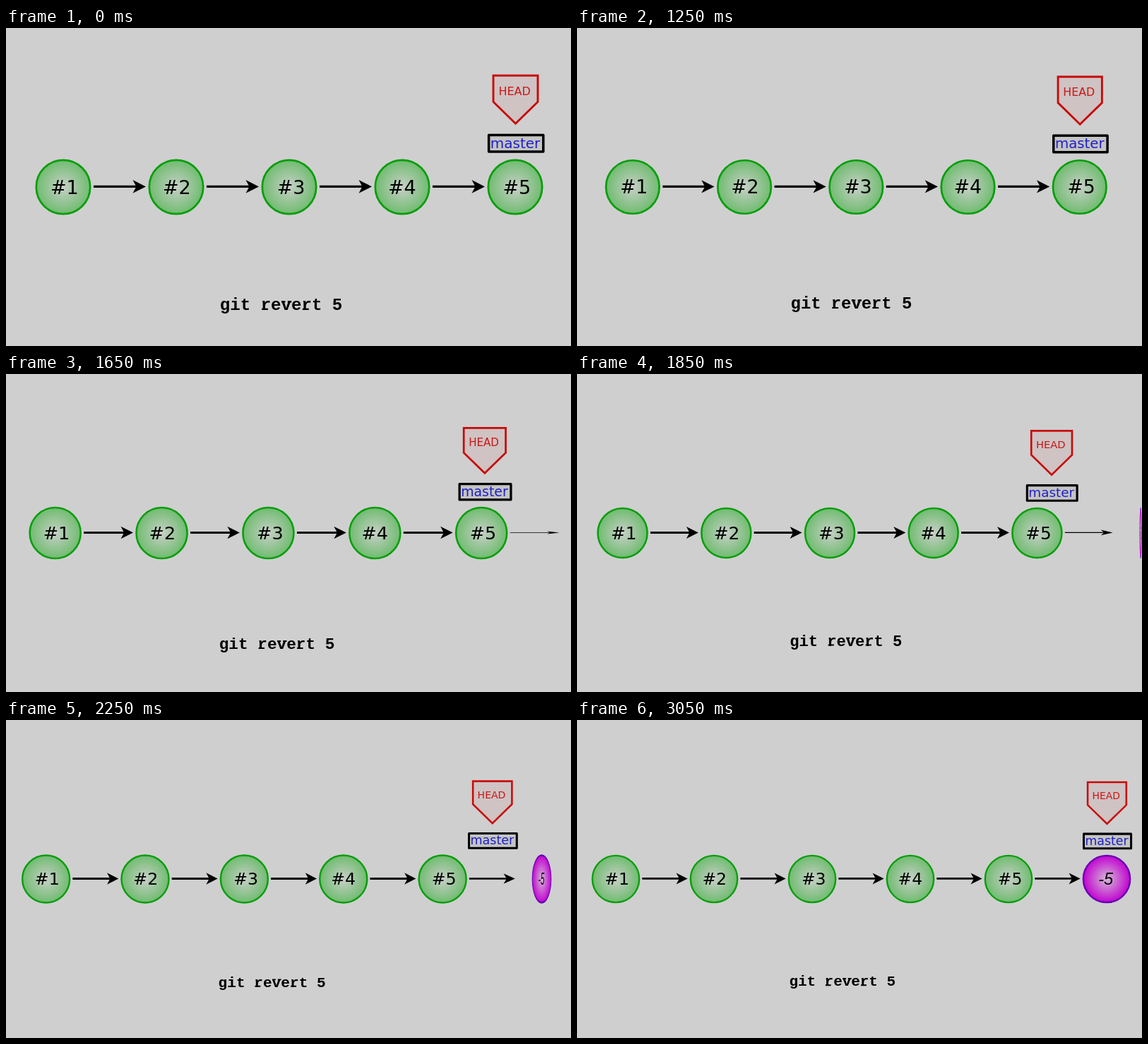
Animation of 800 by 450 pixels, one loop 5.6 s. Source, as an HTML page:

```html
<!DOCTYPE html>
<html lang="en">
<head>
<meta charset="utf-8">
<title>git revert</title>
<style>
  html, body { margin: 0; width: 100%; height: 100%; overflow: hidden; background: #cfcfcf; }
  svg { display: block; width: 100vw; height: 100vh; }
  text { font-family: "DejaVu Sans", sans-serif; }
  .commit circle { fill: url(#green); stroke: #079d0b; stroke-width: 2.7; }
  .commit text { font-size: 27px; }
  .undo circle { fill: url(#purple); stroke: #6503b2; stroke-width: 2.7; }
  .undo text { font: italic 27px "Liberation Sans", Arial, sans-serif; }
  .head path { fill: #c800000f; stroke: #c90909; stroke-width: 2.9; }
  .head text { font-size: 16px; fill: #cb1717; }
  .branch rect { fill: #0000000d; stroke: #000; stroke-width: 3.5; stroke-linejoin: round; }
  .branch text { font-size: 20px; fill: #2020c8; }
  #command text { font: bold 24.1px "Liberation Mono", "Courier New", monospace; white-space: pre; }
  #command path { stroke: #000; stroke-width: 2.2; }
</style>
</head>
<body>
<svg id="stage" viewBox="0 0 800 450" preserveAspectRatio="none">
  <defs>
    <radialGradient id="green">
      <stop offset="0" stop-color="#c8cfc8"/>
      <stop offset="1" stop-color="#70bc70"/>
    </radialGradient>
    <radialGradient id="purple">
      <stop offset="0" stop-color="#d3b8d5"/>
      <stop offset="1" stop-color="#c204d0"/>
    </radialGradient>
    <g id="arrow">
      <path d="M-37 0H26" stroke="#000" stroke-width="3.2"/>
      <path d="M37 0L18.5-9.3L23.5 0L18.5 9.3Z"/>
    </g>
  </defs>

  <g id="history"></g>
  <use id="newArrow" href="#arrow"/>
  <g id="newCommit" class="undo">
    <circle r="38.2"/>
    <text x="-13.5" y="9.6">-5</text>
  </g>

  <g id="labels">
    <g class="head">
      <path d="M690 67.3H753V104.5L721.5 135.2L690 104.5Z"/>
      <text x="697.4" y="94.6">HEAD</text>
    </g>
    <g class="branch">
      <rect x="683.6" y="151.5" width="77.2" height="23.6"/>
      <text x="685.8" y="169.6">master</text>
    </g>
  </g>

  <g id="command">
    <text x="302.8" y="399">git revert 5</text>
    <path d="M362 397.9H371M419.8 397.9H428.8M390 387.3H395.5M398.8 387.3H404.3"/>
  </g>
</svg>
<script>
const LOOP = 5600, TICK = 50, STEP = 160, FIRST_X = 81, MID_Y = 225;
const $ = id => document.getElementById(id);
const place = (el, x, y, sx = 1, sy = 1) =>
  el.setAttribute('transform', `translate(${x} ${y}) scale(${sx} ${sy})`);

// Left edge of each label relative to its circle's centre.
const labelX = [-18, -19, -17.3, -20, -17.5];
$('history').innerHTML = labelX.map((dx, i) => {
  const x = FIRST_X + i * STEP;
  const arrow = i < 4 ? `<use href="#arrow" x="${x + 80}" y="224.4"/>` : '';
  return `<g class="commit"><circle cx="${x}" cy="${MID_Y}" r="38.2"/>
    <text x="${x + dx}" y="234.6">#${i + 1}</text></g>${arrow}`;
}).join('');

function ease(t, start, end) {
  const u = Math.min(1, Math.max(0, (t - start) / (end - start)));
  return u * u * (3 - 2 * u);
}

function draw(t) {
  const zoom = ease(t, 1000, 2500);
  const size = 1 + 0.151 * zoom;
  $('stage').setAttribute('viewBox',
    `${17.75 * zoom} ${MID_Y * (1 - size)} ${800 * size} ${450 * size}`);
  place($('command'), 60.7 * zoom, 0);
  place($('newArrow'), FIRST_X + 4.5 * STEP, 224.4, 1, ease(t, 1270, 2500));
  place($('labels'), STEP * ease(t, 1500, 3000), 0);
  place($('newCommit'), FIRST_X + 5 * STEP, MID_Y, ease(t, 1680, 3000), 1);
}

const begin = performance.now();
function frame() {
  const t = (performance.now() - begin) % LOOP;
  draw(Math.floor(t / TICK) * TICK);
  requestAnimationFrame(frame);
}
frame();
</script>
</body>
</html>
```
